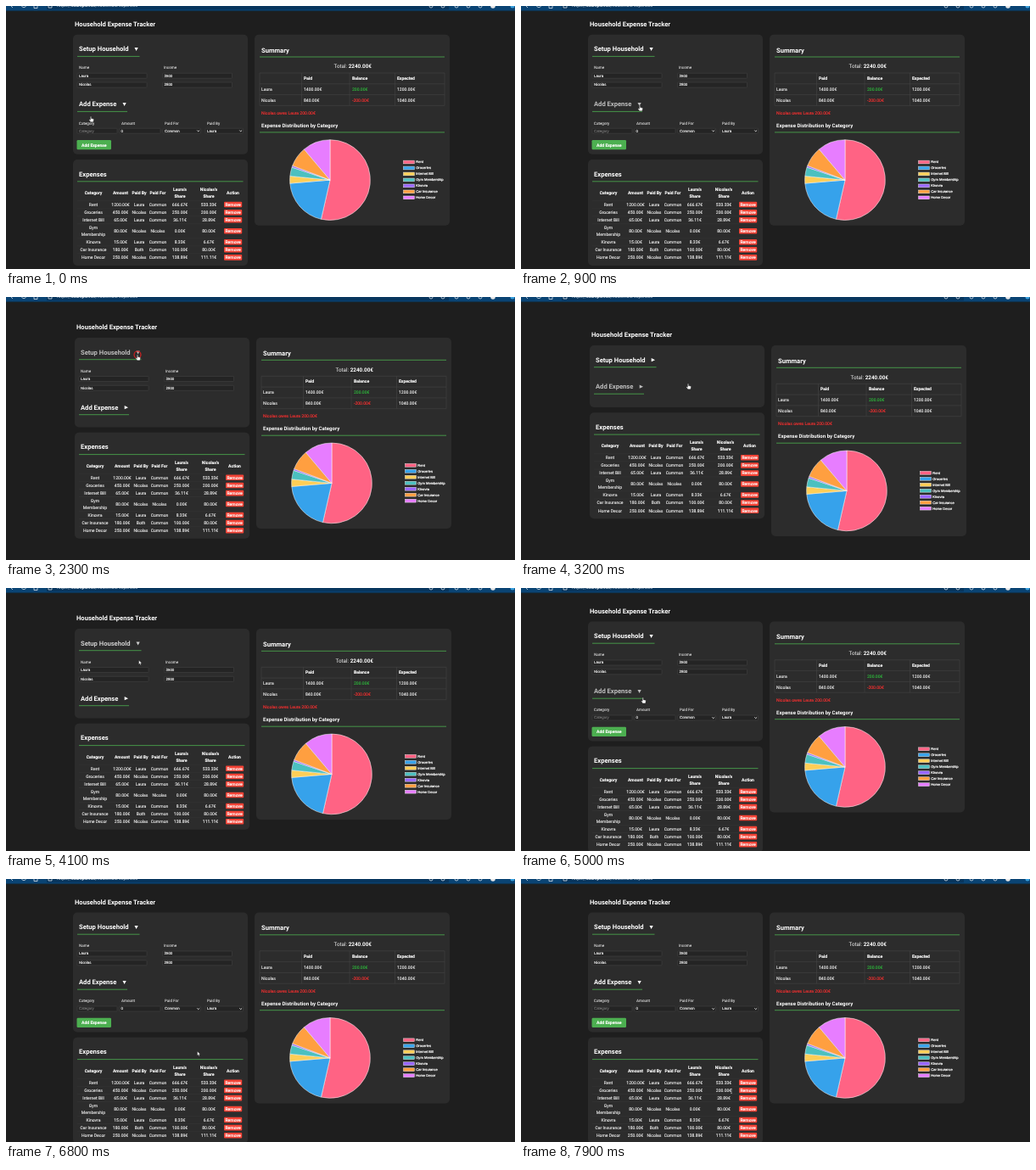
An HTML page that plays this animation: 600x310 px, repeating every 8000 ms.

```html
<!DOCTYPE html>
<html lang="en">
<head>
<meta charset="utf-8">
<title>Household Expense Tracker</title>
<style>
  html, body { margin: 0; width: 100%; height: 100%; overflow: hidden; background: #1e1e1e; }
  svg { display: block; width: 600px; height: 310px; }
  text { font-family: Roboto, sans-serif; text-rendering: geometricPrecision; white-space: pre; }
  .arial { font-family: "Liberation Sans", Arial, sans-serif; }
</style>
</head>
<body>
<svg id="stage" viewBox="0 0 600 310"></svg>
<script>
const LOOP = 8000;
const GREEN = '#4caf50', RED = '#f44336', LINE = '#444', SOFT = '#f0f0f0';
const stage = document.getElementById('stage');

function add(parent, tag, attrs) {
  const el = document.createElementNS('http://www.w3.org/2000/svg', tag);
  for (const k in attrs) el.setAttribute(k, attrs[k]);
  parent.appendChild(el);
  return el;
}
const group = (parent) => add(parent, 'g', {});
const rect = (p, x, y, width, height, fill, more) =>
  add(p, 'rect', { x, y, width, height, fill, ...more });
const rule = (p, x1, x2, y, stroke = GREEN, w = 0.8) =>
  add(p, 'line', { x1, x2, y1: y, y2: y, stroke, 'stroke-width': w });
// y is the vertical middle of the capitals; small text gets a hairline to stay legible
function text(p, x, y, str, size = 5.07, fill = SOFT, more = {}) {
  const hairline = size < 6 ? { stroke: fill, 'stroke-width': 0.13 } : {};
  const el = add(p, 'text', { x, y: y + size * 0.36, 'font-size': size, fill, ...hairline, ...more });
  el.textContent = str;
  return el;
}
const BOLD = { 'font-weight': 700 };
const MID = { 'text-anchor': 'middle' };
const ARIAL = { class: 'arial' };
const card = (p, x, y, w, h) => rect(p, x, y, w, h, '#2c2c2c', { rx: 5 });

// ---------- page ----------
const page = group(stage);
text(page, 81, -12.4, 'Household Expense Tracker', 7.6, '#fff', BOLD);

// setup card
const setupCard = card(page, 79, 0, 206, 141);

function field(p, x, y, w, value, fill = '#fff') {
  rect(p, x, y - 3, w, 6, '#242424', { stroke: '#464646', 'stroke-width': 0.5, rx: 0.6 });
  text(p, x + 2, y - 0.2, value, 4.4, fill, ARIAL);
}
function heading(p, label, lineEnd, arrowX) {
  const g = group(p);
  const title = text(g, 86, 0, label, 7.6, '#fff', BOLD);
  rule(g, 84, lineEnd, 8.7);
  const arrow = add(g, 'path', { fill: '#fff' });
  return { g, title, arrow, arrowX };
}
const label = (p, x, y, s) => text(p, x, y, s, 4.56, '#cfcfcf');

const setup = heading(page, 'Setup Household', 157.5, 153.6);
setup.g.setAttribute('transform', 'translate(0 17)');
const members = group(page);
label(members, 86, 39, 'Name');
label(members, 186, 39, 'Income');
[['Laura', '3500'], ['Nicolas', '2800']].forEach(([name, income], i) => {
  field(members, 84, 48.5 + i * 10.8, 82, name);
  field(members, 184.5, 48.5 + i * 10.8, 82, income);
});

const adder = heading(page, 'Add Expense', 143, 139.6);
const form = group(page);
function select(x, w, value) {
  field(form, x, 113.5, w, value);
  add(form, 'path', { d: `M${x + w - 4.2} 112.8l1.4 1.4 1.4-1.4`, fill: 'none', stroke: '#fff', 'stroke-width': 0.8 });
}
[[86, 'Category'], [136, 'Amount'], [187, 'Paid For'], [237, 'Paid By']]
  .forEach(([x, s]) => label(form, x, 104.2, s));
field(form, 84, 113.5, 47, 'Category', '#757575');
field(form, 133.5, 113.5, 48.5, '0');
select(185, 44.5, 'Common');
select(235, 44.5, 'Laura');
rect(form, 83.5, 124.2, 40.5, 11.4, GREEN, { rx: 1.4 });
text(form, 103.8, 130, 'Add Expense', 5.07, '#fff', { ...BOLD, ...MID });

// expenses card
const expenses = group(page);
card(expenses, 79, 0, 206, 125);
text(expenses, 86, 16.8, 'Expenses', 7.6, '#fff', BOLD);
rule(expenses, 84, 279.5, 25.8);
const COLS = [103, 135, 157, 179, 205, 239, 267.5];
function cell(col, y, s, bold) {
  const parts = s.split('|');
  parts.forEach((part, i) =>
    text(expenses, COLS[col], y + (i - (parts.length - 1) / 2) * 8, part, 5.07,
      bold ? '#fff' : SOFT, bold ? { ...BOLD, ...MID } : MID));
}
['Category', 'Amount', 'Paid By', 'Paid For', "Laura's|Share", "Nicolas's|Share", 'Action']
  .forEach((s, i) => cell(i, 39.3, s, true));
const ROWS = [
  [53, 'Rent', '1200.00€', 'Laura', 'Common', '666.67€', '533.33€'],
  [62.2, 'Groceries', '450.00€', 'Nicolas', 'Common', '250.00€', '200.00€'],
  [71.3, 'Internet Bill', '65.00€', 'Laura', 'Common', '36.11€', '28.89€'],
  [84.2, 'Gym|Membership', '80.00€', 'Nicolas', 'Nicolas', '0.00€', '80.00€'],
  [97.2, 'Kinovra', '15.00€', 'Laura', 'Common', '8.33€', '6.67€'],
  [106.3, 'Car Insurance', '180.00€', 'Both', 'Common', '100.00€', '80.00€'],
  [115.4, 'Home Decor', '250.00€', 'Nicolas', 'Common', '138.89€', '111.11€']
];
for (const [y, ...cells] of ROWS) {
  const half = cells[0].includes('|') ? 8.5 : 4.6;
  rule(expenses, 84, 279.5, y - half, '#393939', 0.4);
  cells.forEach((s, i) => cell(i, y, s));
  rect(expenses, 257, y - 3.3, 21.2, 6.6, RED, { rx: 1 });
  text(expenses, 267.6, y, 'Remove', 5.07, '#fff', { ...MID, 'font-weight': 500 });
}

// summary card
const summary = group(page);
card(summary, 293, 0, 230, 225);
text(summary, 301, 18.2, 'Summary', 7.6, '#fff', BOLD);
rule(summary, 299, 517, 26.3);
const total = text(summary, 408.7, 37.4, 'Total: ', 6.33, SOFT, MID);
add(total, 'tspan', { ...BOLD, fill: '#fff' }).textContent = '2240.00€';
[45.3, 58.1, 70.9, 83.7].forEach((y) => rule(summary, 299, 517, y, LINE, 0.6));
[299, 348.5, 405, 458.5, 517].forEach((x) =>
  add(summary, 'line', { x1: x, x2: x, y1: 45.3, y2: 83.7, stroke: LINE, 'stroke-width': 0.6 }));
const SUM_X = [301, 351, 408, 461];
[
  ['', 'Paid', 'Balance', 'Expected'],
  ['Laura', '1400.00€', '200.00€', '1200.00€'],
  ['Nicolas', '840.00€', '-200.00€', '1040.00€']
].forEach((row, r) => row.forEach((s, c) => {
  const fill = r && c === 2 ? ['', '#2fb83c', '#ff3030'][r] : r ? SOFT : '#fff';
  text(summary, SUM_X[c], 51.4 + r * 12.9, s, 5.07, fill, r ? {} : BOLD);
}));
text(summary, 301, 92.6, 'Nicolas owes Laura 200.00€', 5.07, '#ff3030');
text(summary, 301, 107.1, 'Expense Distribution by Category', 6.05, '#fff', BOLD);
rule(summary, 299, 517, 115.2);

const PIE = ['#ff6384', '#36a2eb', '#ffce56', '#4bc0c0', '#9966ff', '#ff9f40', '#e77dff'];
const amounts = ROWS.map((r) => parseFloat(r[2]));
const sum = amounts.reduce((a, b) => a + b);
let turn = 0;
const rim = (f) => {
  const a = f * 2 * Math.PI;
  return `${382 + 47.4 * Math.sin(a)} ${171.4 - 47.4 * Math.cos(a)}`;
};
amounts.forEach((amount, i) => {
  const part = amount / sum;
  add(summary, 'path', {
    d: `M382 171.4L${rim(turn)}A47.4 47.4 0 ${part > 0.5 ? 1 : 0} 1 ${rim(turn + part)}Z`,
    fill: PIE[i], stroke: '#fff', 'stroke-width': 0.5, 'stroke-linejoin': 'round'
  });
  turn += part;
  const y = 150.3 + i * 6.98;
  rect(summary, 468.5, y - 1.9, 13, 3.8, PIE[i], { stroke: '#fff', 'stroke-width': 0.4 });
  text(summary, 483.2, y, ROWS[i][1].replace('|', ' '), 4.1, '#fff', { ...ARIAL, 'stroke-width': 0.2 });
});

// ---------- browser bar, cut off by the top edge ----------
const bar = group(stage);
rect(bar, 0, 0, 600, 6, '#0a4474');
rect(bar, 48, 0, 474, 4.2, '#08365e');
rect(bar, 0, 5.4, 600, 0.8, '#122838');
const url = text(bar, 60, -0.9, 'https://', 5.2, '#b9c7d4');
add(url, 'tspan', { fill: '#fff', 'font-weight': 500 }).textContent = 'example.net';
add(url, 'tspan', {}).textContent = '/household-expenses';
const icon = (d) => add(bar, 'path', { d, fill: 'none', stroke: '#d5dfe8', 'stroke-width': 0.8 });
icon('M6 0l2 2');
icon('M18.5 0a2.7 2.7 0 0 0 5 0');
icon('M33 0v2.5h4V0');
icon('M50 0v2h4V0');
[501, 515, 531, 545, 559].forEach((x) => icon(`M${x - 2} 0a2 2 0 0 0 4 0`));
add(bar, 'circle', { cx: 574, cy: 0, r: 2.8, fill: '#e8e8e8' });
add(bar, 'circle', { cx: 597, cy: 0, r: 2.5, fill: '#3aa0dd' });

// ---------- pointer ----------
const ring = add(stage, 'circle', { r: 4, fill: 'none', stroke: '#e02020', 'stroke-width': 1.1 });
const pointer = group(stage);
const SHAPES = {
  arrow: add(pointer, 'path', {
    d: 'M0 0V5.2L1.2 4.1 2 5.9 2.9 5.5 2.1 3.8H3.7Z',
    fill: '#fff', stroke: '#111', 'stroke-width': 0.4
  }),
  hand: add(pointer, 'path', {
    d: 'M-.6 .4Q0-.4.6 .4V2.6L3 3.1Q3.6 3.3 3.5 4L3 6.8H-.3L-2.2 4.2Q-2 3.4-1.3 3.8L-.6 4.4Z',
    fill: '#fff', stroke: '#111', 'stroke-width': 0.4
  }),
  beam: add(pointer, 'path', {
    d: 'M-1-2.6H1M0-2.6V2.6M-1 2.6H1', fill: 'none', stroke: '#ccc', 'stroke-width': 0.5
  })
};

// ---------- motion ----------
// time, card top, x shift, setup open, form open
const LAYOUTS = [
  [0, 33.7, 0, 1, 1], [1100, 48, 2, 1, 0], [2400, 57, 2, 0, 0],
  [3800, 48, 2, 1, 0], [4900, 39.5, 0, 1, 1]
];
const PATH = [
  [0, 100, 130], [600, 140, 117], [1100, 140, 117], [1300, 143, 89],
  [1900, 155, 68], [2450, 155, 68], [2650, 160, 75], [2900, 197, 102],
  [3250, 197, 102], [3600, 156, 73], [3950, 156, 74], [4100, 156.5, 85],
  [4600, 142, 128], [4950, 142, 128], [5250, 165, 142], [5600, 206.5, 164.5],
  [6400, 215, 180], [7300, 240, 235], [7900, 248, 250]
];
const CLICKS = [1100, 2400, 3800, 4900];

const lastBefore = (list, t) => list.filter((s) => s[0] <= t).pop();
function layoutAt(t) {
  const [, top, dx, open, formOpen] = lastBefore(LAYOUTS, t);
  return { top, dx, open, formOpen, addY: open ? 82 : 48.5 };
}
function pointerAt(t) {
  const a = lastBefore(PATH, t);
  const b = PATH[PATH.indexOf(a) + 1] || a;
  const p = a === b ? 0 : (t - a[0]) / (b[0] - a[0]);
  const e = p * p * (3 - 2 * p);
  return [a[1] + (b[1] - a[1]) * e, a[2] + (b[2] - a[2]) * e];
}
function hovered(t) {
  const { top, addY } = layoutAt(t);
  const y = pointerAt(t)[1] - top;
  const near = (mid) => y > mid - 8 && y < mid + 15;
  return near(17) ? 'setup' : near(addY) ? 'adder' : '';
}
// share of the last 300 ms spent over a heading
function fade(name, t) {
  let n = 0;
  for (let back = 0; back < 300; back += 25) {
    if (hovered((t - back + LOOP) % LOOP) === name) n++;
  }
  return n / 12;
}
function drawHeading(h, open, glow) {
  const v = Math.round(255 - 65 * glow);
  const fill = `rgb(${v},${v},${v})`;
  const x = h.arrowX;
  h.title.setAttribute('fill', fill);
  h.arrow.setAttribute('fill', fill);
  h.arrow.setAttribute('d', open
    ? `M${x - 2.1}-1.6H${x + 2.1}L${x} 2.4Z`
    : `M${x - 1.9}-1.9L${x + 2.4} .2 ${x - 1.9} 2.3Z`);
}
const show = (el, on) => { el.style.display = on ? '' : 'none'; };

function draw(t) {
  const { top, dx, open, formOpen, addY } = layoutAt(t);
  page.setAttribute('transform', `translate(${dx} ${top})`);
  const height = formOpen ? 141 : open ? 105.5 : 73;
  setupCard.setAttribute('height', height);
  expenses.setAttribute('transform', `translate(0 ${height + 6.3})`);
  adder.g.setAttribute('transform', `translate(0 ${addY})`);
  show(members, open);
  show(form, formOpen);
  drawHeading(setup, open, fade('setup', t));
  drawHeading(adder, formOpen, fade('adder', t));

  const [x, y] = pointerAt(t);
  const kind = hovered(t) ? 'hand' : t > 7100 ? 'beam' : 'arrow';
  for (const k in SHAPES) show(SHAPES[k], k === kind);
  pointer.setAttribute('transform', `translate(${x} ${y})`);
  ring.setAttribute('cx', x);
  ring.setAttribute('cy', y);
  show(ring, CLICKS.some((c) => t >= c - 130 && t < c + 70));
}

const start = performance.now();
function tick() {
  draw((performance.now() - start) % LOOP);
  requestAnimationFrame(tick);
}
tick();
</script>
</body>
</html>
```
